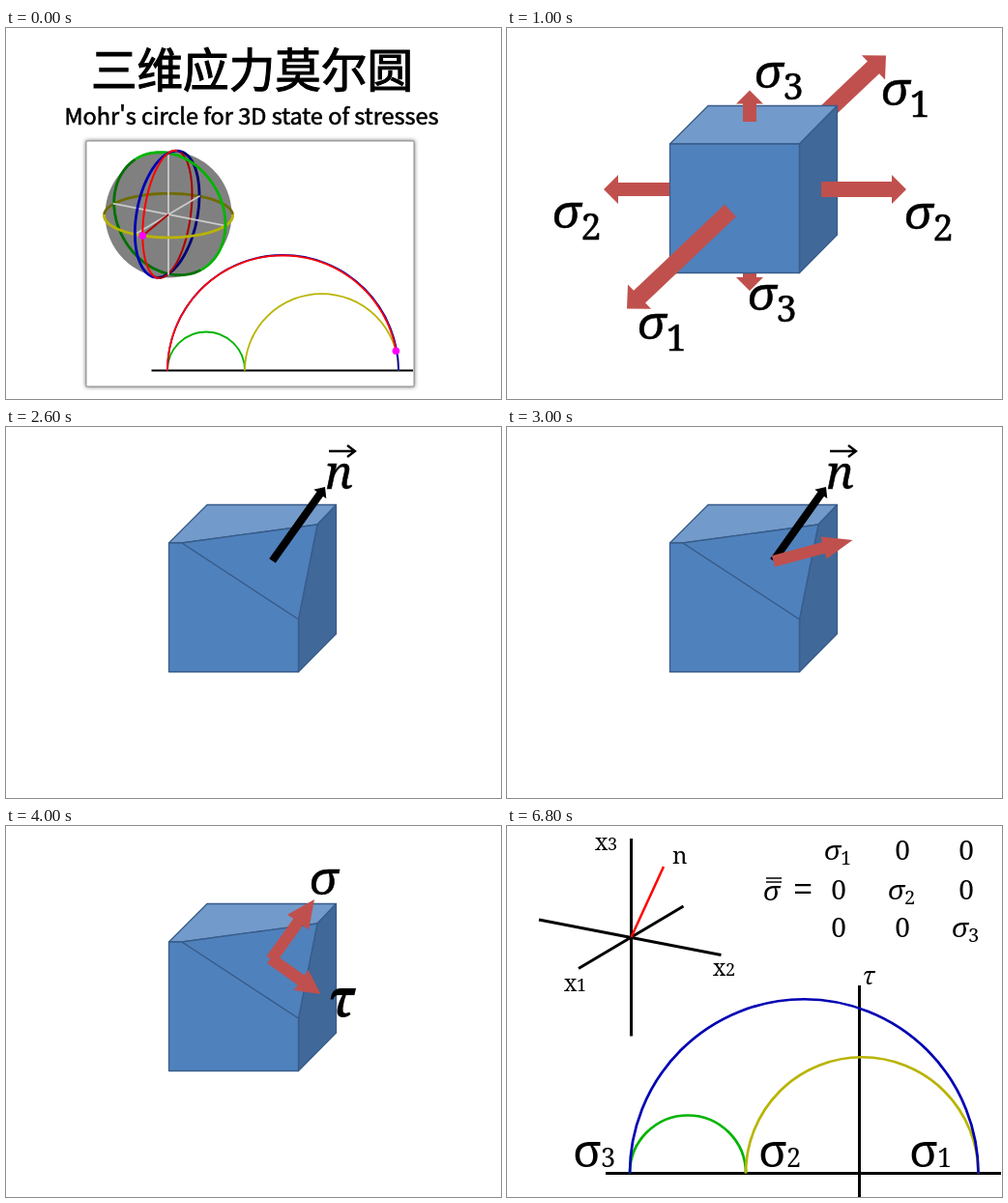
Animation, 512 px wide and 384 px high, one loop 8000 ms. Source, as an HTML page:

```html
<!DOCTYPE html>
<html lang="zh">
<head>
<meta charset="utf-8">
<title>三维应力莫尔圆</title>
<style>
  html, body { margin: 0; width: 100%; height: 100%; overflow: hidden; background: #fff; }
  svg { display: block; width: 100vw; height: 100vh; }
  text { font-family: "Noto Serif", serif; }
  .zh { font: 400 47.6px "Noto Sans CJK SC", sans-serif; text-anchor: middle; stroke: #000; stroke-width: 1.1; }
  .en { font: 400 23.5px "Noto Sans CJK SC", "Open Sans", sans-serif; text-anchor: middle; stroke: #000; stroke-width: .6; }
  .it { font-style: italic; }
  .mid { text-anchor: middle; }
  .heavy { stroke: #000; stroke-width: .5; }
</style>
</head>
<body>
<svg id="stage" viewBox="0 0 512 384"></svg>
<script>
const LOOP = 8000;
const RED = '#c0504d', BLUE = '#4f81bd', EDGE = '#385d8a';

const line = (x1, y1, x2, y2, color = '#000', w = 3) =>
  `<path d="M${x1} ${y1}L${x2} ${y2}" stroke="${color}" stroke-width="${w}"/>`;
const curve = (points, color, w) =>
  `<path d="M${points.map(p => p.map(v => v.toFixed(2))).join('L')}" fill="none" stroke="${color}" stroke-width="${w}"/>`;
const arch = (left, right, y, color, w) =>
  `<path d="M${left} ${y}A1 1 0 0 1 ${right} ${y}" fill="none" stroke="${color}" stroke-width="${w}"/>`;
const face = (points, fill) =>
  `<polygon points="${points}" fill="${fill}" stroke="${EDGE}" stroke-width="1.3" stroke-linejoin="round"/>`;
const dot = (x, y) => `<circle cx="${x}" cy="${y}" r="3.8" fill="#f0f"/>`;
const text = (x, y, size, str, cls = '', extra = '') =>
  `<text x="${x}" y="${y}" font-size="${size}" class="${cls}" ${extra}>${str}</text>`;

// Block arrow from (x1,y1) to the tip (x2,y2).
function arrow(x1, y1, x2, y2, shaft, headWidth, headLength, color = RED) {
  const len = Math.hypot(x2 - x1, y2 - y1), ux = (x2 - x1) / len, uy = (y2 - y1) / len;
  const neck = len - headLength;
  const pts = [[0, shaft], [neck, shaft], [neck, headWidth], [len, 0],
               [neck, -headWidth], [neck, -shaft], [0, -shaft]]
    .map(([along, width]) => [x1 + ux * along - uy * width / 2, y1 + uy * along + ux * width / 2]);
  return `<polygon points="${pts.map(p => p.map(v => v.toFixed(1))).join(' ')}" fill="${color}"/>`;
}

// --- Sphere with great circles, seen from 30° azimuth and 20° elevation ---
const rad = Math.PI / 180;
const [cx, cy, R] = [168, 193, 66.5];
const PERSPECTIVE = 0.05;
const [ca, sa, ce, se] = [Math.cos(30 * rad), Math.sin(30 * rad), Math.cos(20 * rad), Math.sin(20 * rad)];
const depth = ([a, b, c]) => ce * (a * ca + b * sa) + se * c;
function project(v, r = R) {
  const [a, b, c] = v, k = r / (1 - PERSPECTIVE * depth(v));
  return [cx + k * (b * ca - a * sa), cy + k * (se * (a * ca + b * sa) - ce * c)];
}
const mix = (u, v, angle) => u.map((x, i) => x * Math.cos(angle) + v[i] * Math.sin(angle));

const X1 = [1, 0, 0], X2 = [0, 1, 0], X3 = [0, 0, 1];
const normal = mix(X1, X2, 7.4 * rad);

// Half of the great circle through u and v: side 1 faces the viewer, -1 lies behind.
function halfCircle(u, v, side, color, w) {
  const start = Math.atan2(depth(v), depth(u)) - Math.PI / 2 + (side < 0 ? Math.PI : 0);
  const pts = Array.from({ length: 61 }, (_, i) => project(mix(u, v, start + Math.PI * i / 60)));
  return curve(pts, color, w);
}

function sphere() {
  const rings = [
    [X1, X2, '#b8b400', '#6e6c00', 2.8],
    [X2, X3, '#00b400', '#007000', 2.8],
    [X1, X3, '#0000b4', '#000078', 2.8],
    [normal, X3, '#ff0000', '#aa0000', 2]
  ];
  const axes = [X1, X2, X3].map(v =>
    line(...project(v, R * 1.02), ...project(v.map(x => -x), R * 1.02), '#cacaca', 1.8)).join('');
  const tip = project(normal);
  return `<circle cx="${cx}" cy="${cy}" r="${R - 1}" fill="#808080"/>` +
    rings.map(([u, v, , dark, w]) => halfCircle(u, v, -1, dark, w)).join('') + axes +
    line(cx, cy, ...tip, '#b40000', 1.8) +
    rings.map(([u, v, bright, , w]) => halfCircle(u, v, 1, bright, w)).join('') + dot(...tip);
}

// Normal and shear stress on the plane with normal n, in stage coordinates.
function stressPoint(n, base) {
  const s = [406, 247, 167];
  const mean = s.reduce((sum, v, i) => sum + v * n[i] ** 2, 0);
  const square = s.reduce((sum, v, i) => sum + (v * n[i]) ** 2, 0);
  return [mean, base - Math.sqrt(Math.max(0, square - mean ** 2))];
}

function titleScene() {
  const base = 354.5;
  const locus = Array.from({ length: 91 }, (_, i) => stressPoint(mix(normal, X3, i * rad), base));
  return text(254.5, 61, 47, '三维应力莫尔圆', 'zh') +
    text(254, 100, 23, "Mohr's circle for 3D state of stresses", 'en') +
    `<rect x="83" y="117" width="339" height="254" fill="#fff" stroke="#888" stroke-width=".9"
      style="filter:drop-shadow(0 0 2px #0009)"/>` + sphere() +
    line(150.5, base, 421, base, '#000', 2) +
    arch(167, 247, base, '#00b400', 1.8) + arch(247, 406, base, '#b8b400', 1.8) +
    arch(167, 406, base, '#0000b4', 1.8) + curve(locus, '#f00', 1.8) + dot(...locus[0]);
}

// --- Stress cube ---
const sigma = (x, y, index) =>
  text(x, y, 48, 'σ', 'it heavy') + text(x + 29.5, y + 12, 37.5, index, 'heavy');

function cubeScene() {
  return arrow(322, 95, 392, 28.5, 17.5, 35, 18) + arrow(251, 240, 251, 272, 14, 28, 14) +
    face('168.5,120 208,80.5 341.5,80.5 302.5,120', '#729aca') +
    face('302.5,120 341.5,80.5 341.5,214 302.5,253.5', '#406898') +
    face('168.5,120 302.5,120 302.5,253.5 168.5,253.5', BLUE) +
    arrow(251, 97, 251, 64.5, 14, 28, 14) + arrow(168, 167, 100, 167, 14, 30, 15) +
    arrow(325, 167, 413, 167, 16, 30, 15) + arrow(231, 189, 124, 290.5, 17.5, 35, 18) +
    sigma(256, 62, 3) + sigma(387, 79.5, 1) + sigma(47, 206.5, 2) +
    sigma(411, 207.5, 2) + sigma(249, 291.5, 3) + sigma(135, 321.5, 1);
}

const cutCube =
  face('168.5,120 208,80.5 341.5,80.5 322,101 182,120', '#729aca') +
  face('341.5,80.5 341.5,214 302.5,253.5 302.5,199 322,101', '#406898') +
  face('168.5,120 182,120 302.5,199 302.5,253.5 168.5,253.5', BLUE) +
  face('182,120 322,101 302.5,199', BLUE);

const normalArrow = arrow(275.5, 138.5, 330, 62, 8, 16, 9, '#000') +
  text(330, 64, 48, 'n', 'it heavy') +
  '<path d="M334 25H360M353 19L361 25L353 31" fill="none" stroke="#000" stroke-width="2.3"/>';
const stressArrow = arrow(275.5, 139, 357.5, 117, 12, 24, 31);
const components = arrow(274.5, 138, 319, 76, 12, 27, 29) + arrow(273.5, 137, 325.5, 174, 12, 26, 25);
const parallelogram = line(316, 80, 360, 118.5, '#000', 2) + line(360, 118.5, 319, 173.5, '#000', 2);
const componentLabels = text(314, 71, 48, 'σ', 'it heavy') +
  text(334, 196.5, 54, 'τ', 'it', 'font-weight="700"');

// --- Stress tensor and its circles ---
function diagramScene() {
  const axisLabel = (x, y, i) => text(x, y, 23, 'x') + text(x + 13, y, 18, i);
  const bigSigma = (x, i) => text(x, 352.5, 48, 'σ') + text(x + 29, 352.5, 27, i);
  const base = 359.5, cols = [343, 409, 475], rows = [35, 76, 115];
  const matrix = rows.map((y, r) => cols.map((x, c) => r === c
    ? text(x - 15, y, 28, 'σ', 'it') + text(x + 2, y + 5, 20, r + 1)
    : text(x, y, 28, 0, 'mid')).join('')).join('');
  return line(128.5, 13, 128.5, 217.5) + line(33, 97, 221.5, 133.5) + line(74, 147.5, 182.5, 83) +
    line(128.5, 115, 162, 42, '#f00', 2.5) +
    axisLabel(91, 25, 3) + axisLabel(213, 155, 2) + axisLabel(59, 171, 1) +
    text(171, 39, 24, 'n') + matrix +
    text(265, 77, 28, 'σ', 'it') + line(268, 54, 284, 54, '#000', 1.5) + line(268, 58, 284, 58, '#000', 1.5) +
    text(306, 79, 38, '=', 'mid') +
    line(102, base, 511, base) + line(364.5, 165, 364.5, 384) +
    arch(127, 247, base, '#00b400', 2.7) + arch(247, 487.5, base, '#b8b400', 2.7) +
    arch(127, 487.5, base, '#0000b4', 2.7) +
    text(368, 164, 25, 'τ', 'it') + bigSigma(68, 3) + bigSigma(260, 2) + bigSigma(416, 1);
}

// Each layer: start ms, end ms, drawing.
const layers = [
  [0, 1000, titleScene()],
  [1000, 2000, cubeScene()],
  [2000, 5000, cutCube],
  [2000, 4000, normalArrow],
  [3000, 4000, stressArrow],
  [3500, 5000, components],
  [3500, 4000, parallelogram],
  [4000, 5000, componentLabels],
  [5000, 8000, diagramScene()]
];
const stage = document.getElementById('stage');
stage.innerHTML = layers.map(layer => `<g>${layer[2]}</g>`).join('');
const groups = [...stage.children];

const begin = performance.now();
function draw() {
  const t = (performance.now() - begin) % LOOP;
  layers.forEach(([from, to], i) => {
    groups[i].style.display = t >= from && t < to ? '' : 'none';
  });
  requestAnimationFrame(draw);
}
draw();
</script>
</body>
</html>
```
